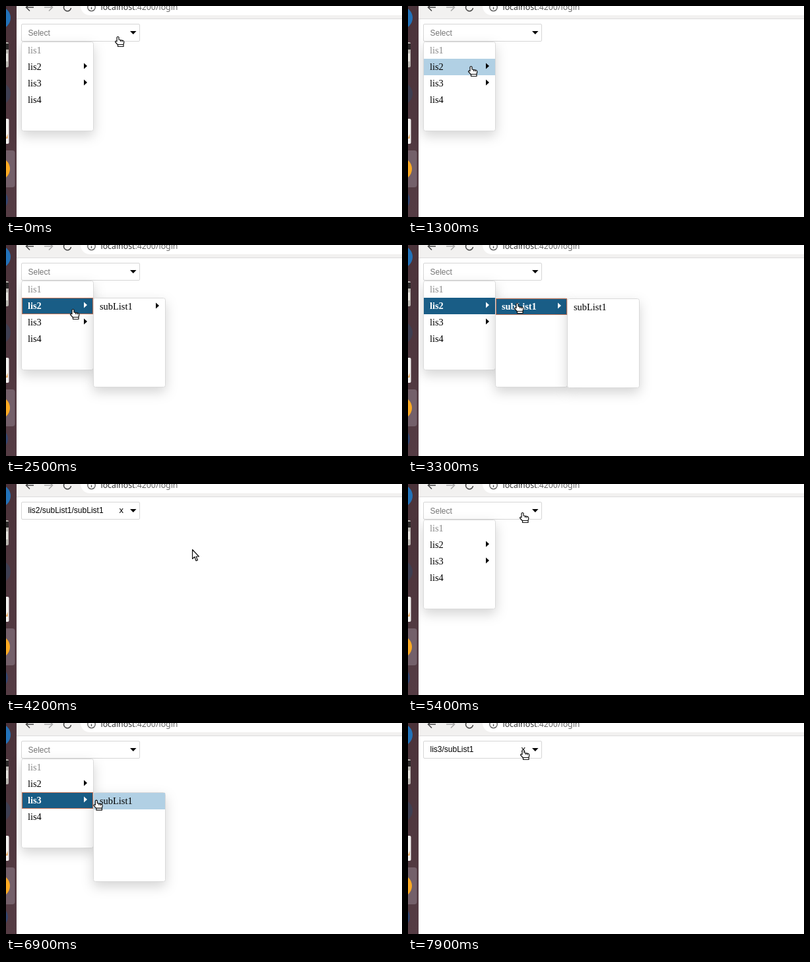
Recreate the animation shown at these times as an HTML page. Size 600 px wide and 320 px high, loop 8000 ms.

```html
<!DOCTYPE html>
<html lang="en">
<head>
<meta charset="utf-8">
<title>Nested select</title>
<style>
html, body { margin: 0; width: 100%; height: 100%; overflow: hidden; background: #fff; }
svg { display: block; width: 100%; height: 100%; }
.field { font: 12px "Liberation Sans", Arial, sans-serif; }
.item { font: 14.4px "Liberation Serif", "Times New Roman", serif; }
.url { font: 12.3px "Noto Sans", "Open Sans", sans-serif; }
.panel { filter: drop-shadow(0 7px 9px rgba(0, 0, 0, .17)); }
.line { fill: none; stroke-width: 1.6; }
</style>
</head>
<body>
<svg viewBox="0 0 600 320">
  <defs>
    <linearGradient id="dock" x2="0" y2="1">
      <stop stop-color="#4b333a"/><stop offset="1" stop-color="#553c44"/>
    </linearGradient>
  </defs>
  <rect width="600" height="320" fill="#fff"/>
  <!-- browser bar -->
  <rect x="16" width="584" height="19" fill="#f2f1f0"/>
  <rect x="113" y="-14" width="520" height="28" rx="14" fill="#fff"/>
  <path d="M16 19.5H600" stroke="#dcdcdc"/>
  <path class="line" d="M42 2H31M36-3.5L30.5 2L36 7.5" stroke="#4a4a4a"/>
  <path class="line" d="M58 2H69M65-3.5L70.500 2L65 7.500" stroke="#a9a9a9"/>
  <path class="line" d="M97.500-1A5.500 5.500 0 1 0 98.500 3" stroke="#4a4a4a"/>
  <circle class="line" cx="129.500" cy="2" r="5.700" stroke="#555" style="stroke-width:1.3"/>
  <path d="M129.500 1.500V5M129.500-1.500V0" stroke="#555" stroke-width="1.4"/>
  <text class="url" x="143.500" y="6" fill="#333">localhost<tspan fill="#666">:4200/login</tspan></text>
  <!-- dock -->
  <rect width="16" height="320" fill="url(#dock)"/>
  <circle cx="-10" cy="18" r="17" fill="#2272b9"/>
  <rect x="-20" y="55" width="24" height="38" rx="2" fill="#b9b5b0"/>
  <path d="M0 57H4V66H0Z" fill="#2d2a2a"/>
  <path d="M0 72H3V84H0Z" fill="#e4e1dc"/>
  <circle cx="-10" cy="133" r="17" fill="#3f3f52"/>
  <rect x="-20" y="171" width="24.500" height="38" rx="2" fill="#f3f2f0"/>
  <path d="M0 201L2.500 194V201Z" fill="#e79a43"/>
  <rect x="-10" y="219" width="23.500" height="56" rx="4" fill="#74606a"/>
  <circle cx="-11" cy="247" r="17" fill="#fba922"/>
  <circle cx="-13" cy="294" r="16" fill="#34456f"/>
  <g id="ui"></g>
</svg>
<script>
const LOOP = 8000, STEP = 100, ROW = 25, W = 108, H = 135;
const ui = document.getElementById("ui");

// Pointer waypoints: time, x, y
const route = [
  [0, 172, 54], [200, 170, 56], [500, 170, 56], [700, 102, 97], [1200, 102, 97],
  [1300, 98, 99], [2000, 103, 104], [2500, 104, 105], [2900, 116, 102],
  [3300, 168, 96], [3800, 285, 100], [4000, 289, 102], [4200, 287, 108],
  [4700, 181, 52], [4900, 179, 49], [5200, 179, 49], [5400, 176, 51],
  [6100, 80, 130], [6600, 82, 128], [7000, 150, 124], [7400, 165, 124],
  [7800, 176, 46], [7900, 177, 48], [8000, 177, 48]
];

// State changes: time, selected rows, chosen value, menu open
const states = [
  [0, [], "", true],
  [2100, [1], "", true],
  [3200, [1, 0], "", true],
  [4000, [], "lis2/subList1/subList1", false],
  [5200, [], "", true],
  [6600, [2], "", true],
  [7400, [], "lis3/subList1", false]
];

const root = ["lis1", "lis2", "lis3", "lis4"];

function pointerAt(t) {
  const i = route.findIndex(p => p[0] > t);
  const [t0, x0, y0] = route[i - 1], [t1, x1, y1] = route[i];
  const u = (t - t0) / (t1 - t0), e = u * u * (3 - 2 * u);
  return { x: x0 + (x1 - x0) * e, y: y0 + (y1 - y0) * e };
}

function openMenus(picked) {
  const menus = [{ x: 24, y: 54, rows: root, parents: [1, 2] }];
  if (picked.length) {
    const y = 55 + ROW * picked[0];
    menus.push({ x: 133, y, rows: ["subList1"], parents: picked[0] === 1 ? [0] : [] });
    if (picked.length > 1) menus.push({ x: 242, y: y + 1, rows: ["subList1"], parents: [] });
  }
  return menus;
}

const inside = (p, x, y, w, h) => p.x >= x && p.x < x + w && p.y >= y && p.y < y + h;

function drawRow(menu, i, selected, focused, tip) {
  const { x } = menu, y = menu.y + 1 + ROW * i;
  const off = menu.rows[i] === "lis1";
  const hover = !off && inside(tip, x, y, W, ROW);
  const ink = selected ? "#fff" : off ? "#8a8a8a" : "#000";
  let out = "";
  if (selected || hover)
    out += `<rect x="${x}" y="${y}" width="${W}" height="${ROW}" fill="${selected ? "#195d86" : "#b1d0e4"}"/>`;
  if (focused)
    out += `<rect x="${x + .5}" y="${y + .5}" width="${W - 1}" height="${ROW - 1}" fill="none" stroke="#c07256"/>`;
  out += `<text class="item" x="${x + 9}" y="${y + 17}" fill="${ink}" ${selected ? 'style="font-weight:bold"' : ""}>${menu.rows[i]}</text>`;
  if (menu.parents.includes(i))
    out += `<path d="M${x + 94} ${y + 6.5}l5 4.500l-5 4.500z" fill="${ink}"/>`;
  return out;
}

function drawMenu(menu, depth, picked, tip) {
  const rows = menu.rows.map((_, i) => {
    const selected = picked[depth] === i;
    return drawRow(menu, i, selected, selected && depth === picked.length - 1, tip);
  });
  return `<rect class="panel" x="${menu.x - .5}" y="${menu.y + .5}" width="${W + 1}" height="${H}" rx="3" fill="#fff" stroke="#dadada"/>` + rows.join("");
}

function drawField(value) {
  return `<rect x="23.500" y="27.500" width="179" height="26" rx="1.500" fill="#fff" stroke="#d6d6d6"/>
    <text class="field" x="33.500" y="${value ? 44 : 45}" fill="${value ? "#000" : "#757575"}">${value || "Select"}</text>
    ${value ? '<text class="field" x="171.500" y="44" style="font-size:13px">x</text>' : ""}
    <path d="M188 38h9.500l-4.750 5z"/>`;
}

function drawPointer({ x, y }, hand) {
  const shape = hand
    ? "M-4-6.500Q-2.500-8.500-1-6.500V-3L5-1.700Q7-1 6.800 1L6 4.500V7.500H-2.500V5L-6.500 .5Q-6.500-1.700-4-.3ZM-2.500 4.500H6M1.500-2V0M4-1.500V.5"
    : "M-4.500-8.500V5.500L-1.300 2.500L1 8.500L3.400 7.500L1 2H5.300Z";
  return `<path transform="translate(${x} ${y})" d="${shape}" fill="#fff" stroke="#111" stroke-width="1.200" stroke-linejoin="round"/>`;
}

function render(t) {
  const [, picked, value, open] = states.filter(s => s[0] <= t).pop();
  const pos = pointerAt(t), tip = { x: pos.x - 2, y: pos.y - 7 };
  const menus = open ? openMenus(picked) : [];
  const hand = inside(tip, 23, 27, 180, 27) || menus.some(m => inside(tip, m.x, m.y, W + 1, H));
  ui.innerHTML = drawField(value) +
    menus.map((m, depth) => drawMenu(m, depth, picked, tip)).join("") +
    drawPointer(pos, hand);
}

let last = -1;
function tick() {
  const t = Math.floor(performance.now() % LOOP / STEP) * STEP;
  if (t !== last) render(last = t);
  requestAnimationFrame(tick);
}
tick();
</script>
</body>
</html>
```
